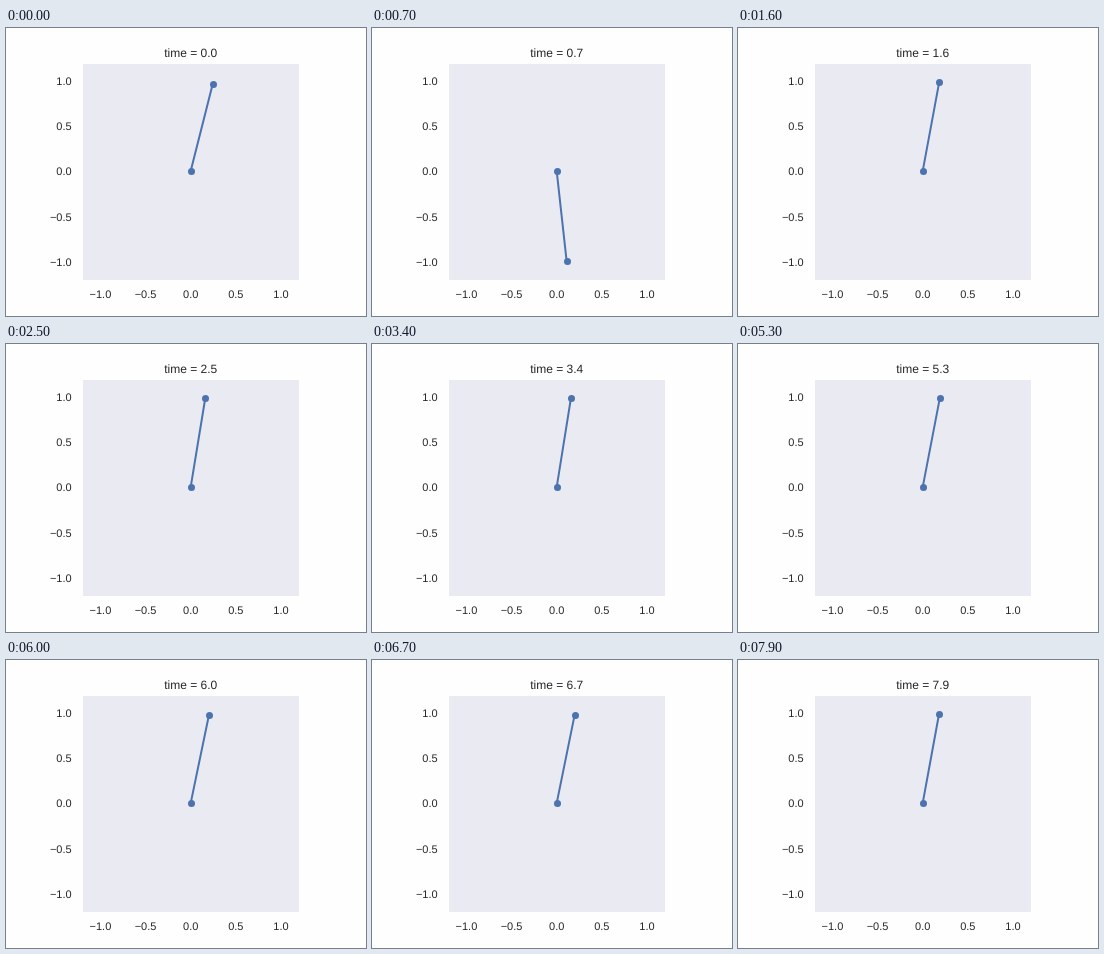
An HTML page for the animation above (8000 ms loop, 360 px wide and 288 px high).

```html
<!DOCTYPE html>
<html lang="en">
<head>
<meta charset="utf-8">
<title>Pendulum</title>
<style>
  html, body { margin: 0; width: 100%; height: 100%; overflow: hidden; background: #fefefe; }
  svg { display: block; width: 360px; height: 288px; }
  text {
    font: 11px "Liberation Sans", Arial, sans-serif;
    fill: #262626;
    text-rendering: geometricPrecision;
  }
  #title { font-size: 12px; }
  #rod { stroke: #4c72b0; stroke-width: 2; stroke-linecap: round; }
  circle { fill: #4c72b0; }
</style>
</head>
<body>
<svg viewBox="0 0 360 288">
  <rect x="77" y="36" width="216" height="216" fill="#eaeaf2"/>
  <g id="ticks"></g>
  <text id="title" x="184.7" y="29" text-anchor="middle">time = 0.0</text>
  <line id="rod"/>
  <circle id="pivot" r="3.5"/>
  <circle id="bob" r="3.5"/>
</svg>
<script>
const STEP = 100, STEPS = 80;
const PX = 184.7, PY = 143.1, UNIT = 90.3;

// Degrees clockwise from upright, one per step: the swing round to the top.
const SWING = [14.2, 8, -8, -32, -63, -101, -144, -186.3, -228,
  -263.7, -293, -315, -330, -340, -346, -348.5, -349.5];

// [step, degrees] while balancing; a small tremble runs between the points.
const HOLD = [[16, 10.5], [34, 9.1], [53, 10.9], [67, 11.5], [79, 10.4]];

const $ = id => document.getElementById(id);

function setAttrs(el, attrs) {
  for (const key in attrs) el.setAttribute(key, attrs[key]);
}

// Markers sit on pixel centres; the rod does not.
const snap = v => Math.round(v) + 0.5;

function placeMarker(id, x, y) {
  setAttrs($(id), { cx: snap(x), cy: snap(y) });
}

function angleAt(n) {
  if (n < SWING.length) return SWING[n];
  const i = HOLD.findIndex(p => p[0] >= n);
  const [n0, a0] = HOLD[i - 1], [n1, a1] = HOLD[i];
  const u = (n - n0) / (n1 - n0);
  return a0 + (a1 - a0) * u + 0.5 * Math.sin(Math.PI * u) * Math.sin(n * 1.7);
}

function addTick(label, x, y, anchor) {
  const el = document.createElementNS("http://www.w3.org/2000/svg", "text");
  setAttrs(el, { x, y, "text-anchor": anchor });
  el.textContent = label;
  $("ticks").append(el);
}

for (let v = -1; v <= 1; v += 0.5) {
  const label = (v < 0 ? "\u2212" : "") + Math.abs(v).toFixed(1);
  addTick(label, PX + v * UNIT, 270, "middle");
  addTick(label, 65.6, Math.round(147.4 - v * UNIT), "end");
}

placeMarker("pivot", PX, PY);
setAttrs($("rod"), { x1: PX, y1: PY });

let shown = -1;
function draw(now) {
  const n = Math.floor(now / STEP) % STEPS;
  if (n !== shown) {
    shown = n;
    const a = angleAt(n) * Math.PI / 180;
    const x = PX + UNIT * Math.sin(a), y = PY - UNIT * Math.cos(a);
    setAttrs($("rod"), { x2: x, y2: y });
    placeMarker("bob", x, y);
    $("title").textContent = "time = " + (n / 10).toFixed(1);
  }
}

const start = performance.now();
function loop() {
  draw(performance.now() - start);
  requestAnimationFrame(loop);
}
loop();
</script>
</body>
</html>
```
